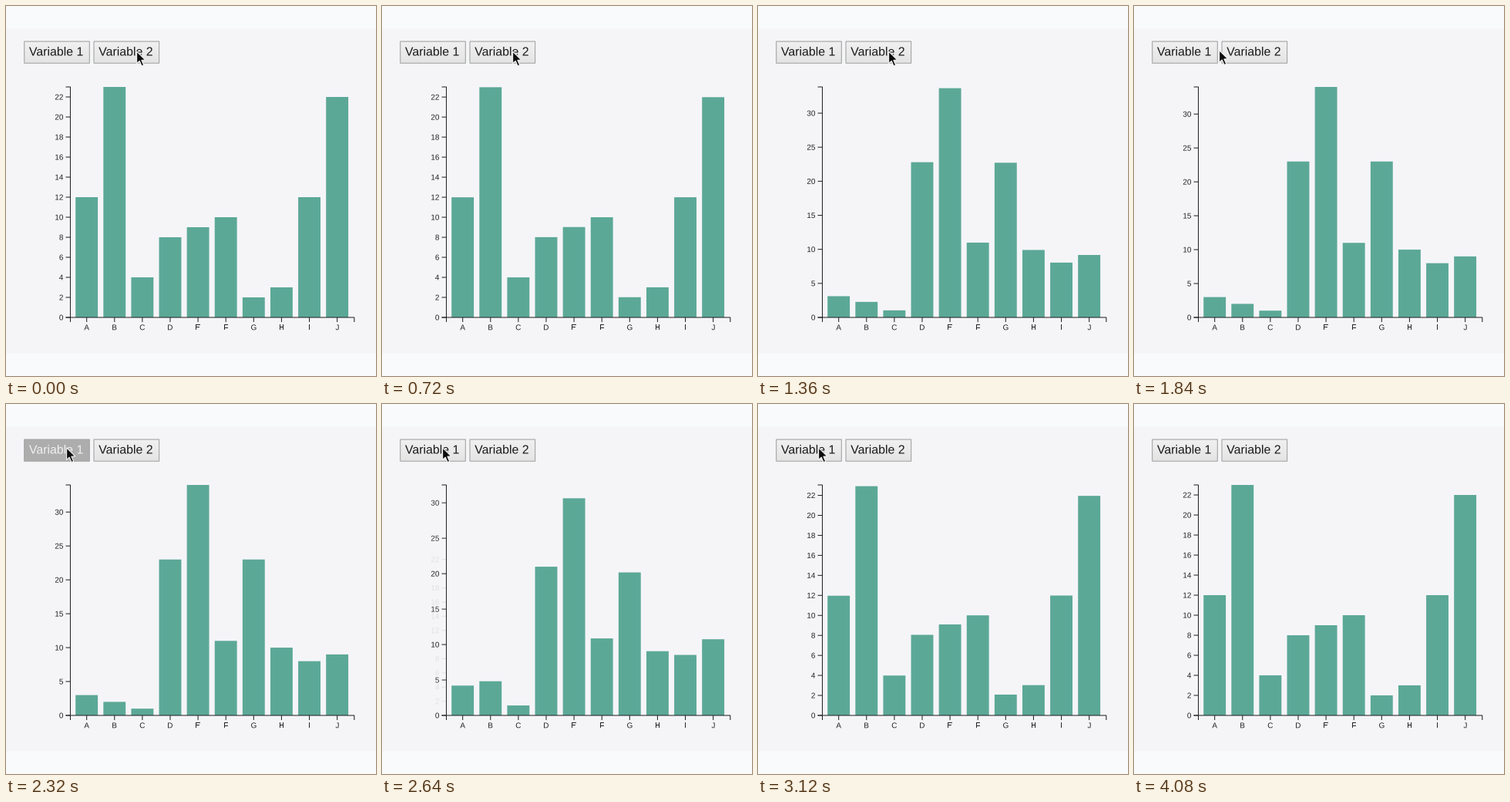
Write a matplotlib script that moves like this. It is 480 px wide and 480 px high and loops after 4240 ms.

```python
import matplotlib.pyplot as plt
import numpy as np
from matplotlib.animation import FuncAnimation
from matplotlib.patches import PathPatch, Polygon, Rectangle
from matplotlib.textpath import TextPath
from matplotlib.transforms import Affine2D

SIZE, STEP, FRAMES = 480, 80, 53
LEFT, TOP, BASE = 83, 105, 404
WIDTH, HEIGHT = 368.3, BASE - TOP
LABEL = 9.95                      # tick label size in pixels
INK = "#242426"
GREEN = "#5ca897"

FIRST = np.array([12, 23, 4, 8, 9, 10, 2, 3, 12, 22])
SECOND = np.array([3, 2, 1, 23, 34, 11, 23, 10, 8, 9])
MAX1, MAX2 = FIRST.max(), SECOND.max()

# times in ms
PRESS2, CLICK2 = 560, 665
PRESS1, CLICK1 = 2320, 2410
DURATION = 800
HIDE_CURSOR = 4080
SPOT2, SPOT1 = np.array([169.6, 59.0]), np.array([78.6, 56.8])

plt.rcParams["font.family"] = "Liberation Sans"
fig = plt.figure(figsize=(4.8, 4.8), dpi=100, facecolor="#f9fafc")
ax = fig.add_axes([0, 0, 1, 1])
ax.axis("off")


def rect(x, y, w, h, color, z=1, **kw):
    patch = Rectangle((x, y), w, h, facecolor=color, zorder=z, snap=False, **kw)
    return ax.add_patch(patch)


def line(x, y, z=2):
    return ax.plot(x, y, color=INK, lw=0.75, zorder=z, snap=False,
                   solid_capstyle="butt", solid_joinstyle="miter")[0]


def place(patch, x, y):
    patch.set_transform(Affine2D().scale(1, -1).translate(x, y) + ax.transData)


def text(s, x, y, size, color=INK, z=2):
    patch = PathPatch(TextPath((0, 0), s, size=size), facecolor=color, lw=0, zorder=z)
    ax.add_patch(patch)
    place(patch, x, y)
    return patch


def ease(u):
    u = min(max(u, 0), 1)
    return 4 * u ** 3 if u < 0.5 else 1 - 4 * (1 - u) ** 3


def mix(a, b, k):
    return a + (b - a) * k


rect(0, 29, SIZE, 421.5, "#f5f5f8", z=0)
clip = Rectangle((0, 75.5), SIZE, SIZE, transform=ax.transData)


class Button:
    def __init__(self, label, x):
        shade = np.linspace(0.945, 0.895, 16)[:, None, None] * np.ones((1, 1, 3))
        ax.imshow(shade, extent=(x, x + 84.6, 74.2, 46), aspect="auto",
                  interpolation="bilinear", zorder=3)
        self.box = rect(x, 46, 84.6, 28.2, "none", z=4, edgecolor="#a3a6a4", lw=0.8)
        self.label = text(label, x + 6.2, 64.4, 15.9, z=5)

    def press(self, down):
        self.box.set_facecolor("#adadad" if down else "none")
        self.label.set_facecolor("#f0f0f0" if down else "#1a1a1a")


class Tick:
    def __init__(self, value):
        self.value = value
        self.in_first = value % 2 == 0 and value <= MAX1
        self.in_second = value % 5 == 0 and value <= MAX2
        s = str(value)
        self.x = LEFT - 8.6 - 0.556 * LABEL * len(s)
        self.label = text(s, self.x, 0, LABEL)
        self.mark = line([LEFT - 5.5, LEFT + 0.5], [0, 0])
        for part in (self.label, self.mark):
            part.set_clip_path(clip)

    def update(self, k):
        scale = mix(HEIGHT / MAX1, HEIGHT / MAX2, k)
        y = BASE - self.value * scale
        place(self.label, self.x, y + 0.35 * LABEL)
        self.mark.set_ydata([y, y])
        alpha = mix(float(self.in_first), float(self.in_second), k)
        self.label.set_alpha(alpha)
        self.mark.set_alpha(alpha)


band = WIDTH / (len(FIRST) + 0.2)
bars = []
for i, letter in enumerate("ABCDEFGHIJ"):
    x = LEFT + band * (i + 0.2)
    bars.append(rect(x, BASE, band * 0.8, 0, GREEN))
    mid = x + band * 0.4
    line([mid, mid], [BASE, BASE + 6])
    box = TextPath((0, 0), letter, size=LABEL).get_extents()
    text(letter, mid - (box.x0 + box.x1) / 2, BASE + 16.3, LABEL)

axis_x = LEFT + 0.5
line([axis_x - 6, axis_x, axis_x, axis_x - 6], [TOP, TOP, BASE, BASE])
end_x = axis_x + WIDTH
line([axis_x, axis_x, end_x, end_x], [BASE + 6, BASE, BASE, BASE + 6])

values = sorted(set(range(0, MAX1, 2)) | set(range(0, MAX2, 5)))
ticks = [Tick(v) for v in values]
button1 = Button("Variable 1", 23.7)
button2 = Button("Variable 2", 114)

ARROW = np.array([(0, 0), (0, 15.6), (3.6, 12.3), (6.5, 18.8), (9.1, 17.6),
                  (6.3, 11.3), (11.2, 11.1)])
cursor = ax.add_patch(Polygon(ARROW, facecolor="#0c0c0c", edgecolor="#f4f4f4",
                              lw=0.8, zorder=6, joinstyle="round"))

ax.set_xlim(0, SIZE)
ax.set_ylim(SIZE, 0)


def update(n):
    t = n * STEP
    k = ease((t - CLICK2) / DURATION) - ease((t - CLICK1) / DURATION)
    heights = mix(FIRST * HEIGHT / MAX1, SECOND * HEIGHT / MAX2, k)
    for bar, h in zip(bars, heights):
        bar.set_y(BASE - h)
        bar.set_height(h)
    for tick in ticks:
        tick.update(k)

    button2.press(PRESS2 <= t < CLICK2)
    button1.press(PRESS1 <= t < CLICK1)

    away = np.clip((t - 1600) / 400, 0, 1)
    back = np.clip((t - 3360) / 240, 0, 1)
    go = [u * u * (3 - 2 * u) for u in (away, back)]
    cursor.set_xy(ARROW + mix(SPOT2, SPOT1, go[0] - go[1]))
    cursor.set_visible(t < HIDE_CURSOR)
    return []


anim = FuncAnimation(fig, update, frames=FRAMES, interval=STEP,
                     init_func=lambda: update(0), repeat=True, repeat_delay=0)
plt.show()
```
